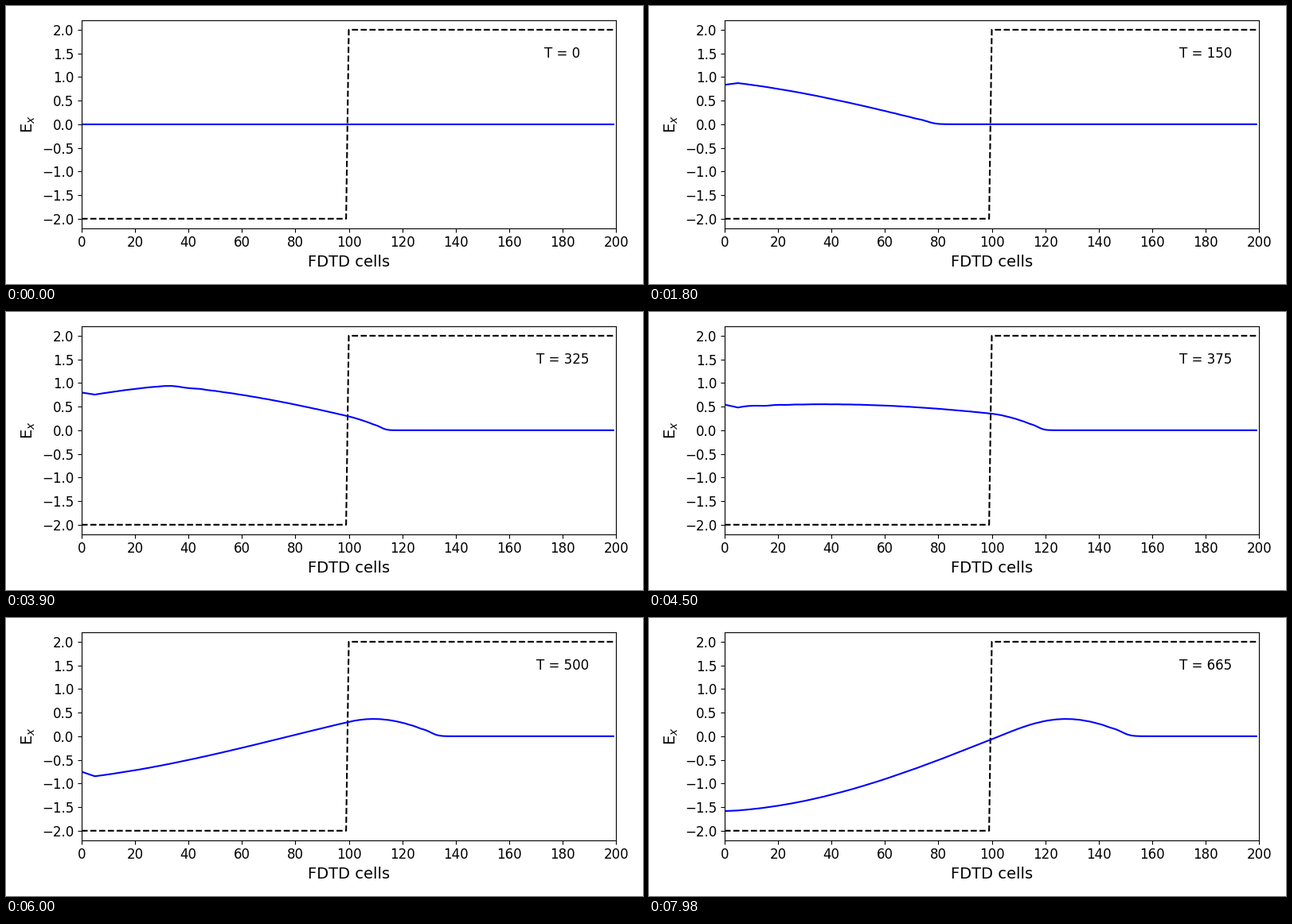
A matplotlib script that plays this animation: 800 by 350 pixels, repeating every 8 s.

```python
import numpy as np
import matplotlib.pyplot as plt
from matplotlib.animation import FuncAnimation

CELLS, SOURCE, EDGE = 200, 5, 100
EPS_R = 20
PERIOD = 200 * np.sqrt(EPS_R)      # time steps; 100 cells per wavelength in the slab
STEPS_PER_SHOT, SHOTS = 5, 134
TICK, LOOP, HOLD = 20, 8000, 3     # ms, ms, ticks per shot


def simulate():
    """1D FDTD run: sine source, absorbing ends, dielectric right half."""
    ex, hy = np.zeros(CELLS), np.zeros(CELLS)
    cb = np.full(CELLS, 0.5)
    cb[EDGE:] /= EPS_R
    low, high = [0.0, 0.0], [0.0, 0.0]
    shots = [ex.copy()]
    for t in range(1, (SHOTS - 1) * STEPS_PER_SHOT + 1):
        ex[1:] += cb[1:] * (hy[:-1] - hy[1:])
        ex[SOURCE] += np.sin(2 * np.pi * t / PERIOD)
        ex[0] = low.pop(0)
        low.append(ex[1])
        ex[-1] = high.pop(0)
        high.append(ex[-2])
        hy[:-1] += 0.5 * (ex[:-1] - ex[1:])
        if t % STEPS_PER_SHOT == 0:
            shots.append(ex.copy())
    return shots


shots = simulate()
cells = np.arange(CELLS)

plt.rcParams["font.family"] = "DejaVu Sans"
plt.rcParams["font.size"] = 12
fig, ax = plt.subplots(figsize=(8, 3.5), dpi=100)
ax.plot(cells, np.where(cells < EDGE, -2, 2), "k--", lw=1.5)
wave, = ax.plot(cells, shots[0], "b", lw=1.5)
label = ax.text(180, 1.5, "T = 0", ha="center", va="center")
ax.set_xlim(0, 200)
ax.set_ylim(-2.2, 2.2)
ax.set_xticks(np.arange(0, 201, 20))
ax.set_yticks(np.arange(-2, 2.1, 0.5))
ax.set_xlabel("FDTD cells", fontsize=14)
ax.set_ylabel("E$_x$", fontsize=14)
fig.tight_layout()


def update(i):
    shot = i // HOLD
    wave.set_ydata(shots[shot])
    label.set_text(f"T = {shot * STEPS_PER_SHOT}")
    return wave, label


anim = FuncAnimation(fig, update, frames=LOOP // TICK, interval=TICK,
                     repeat=True, repeat_delay=0)
plt.show()
```
